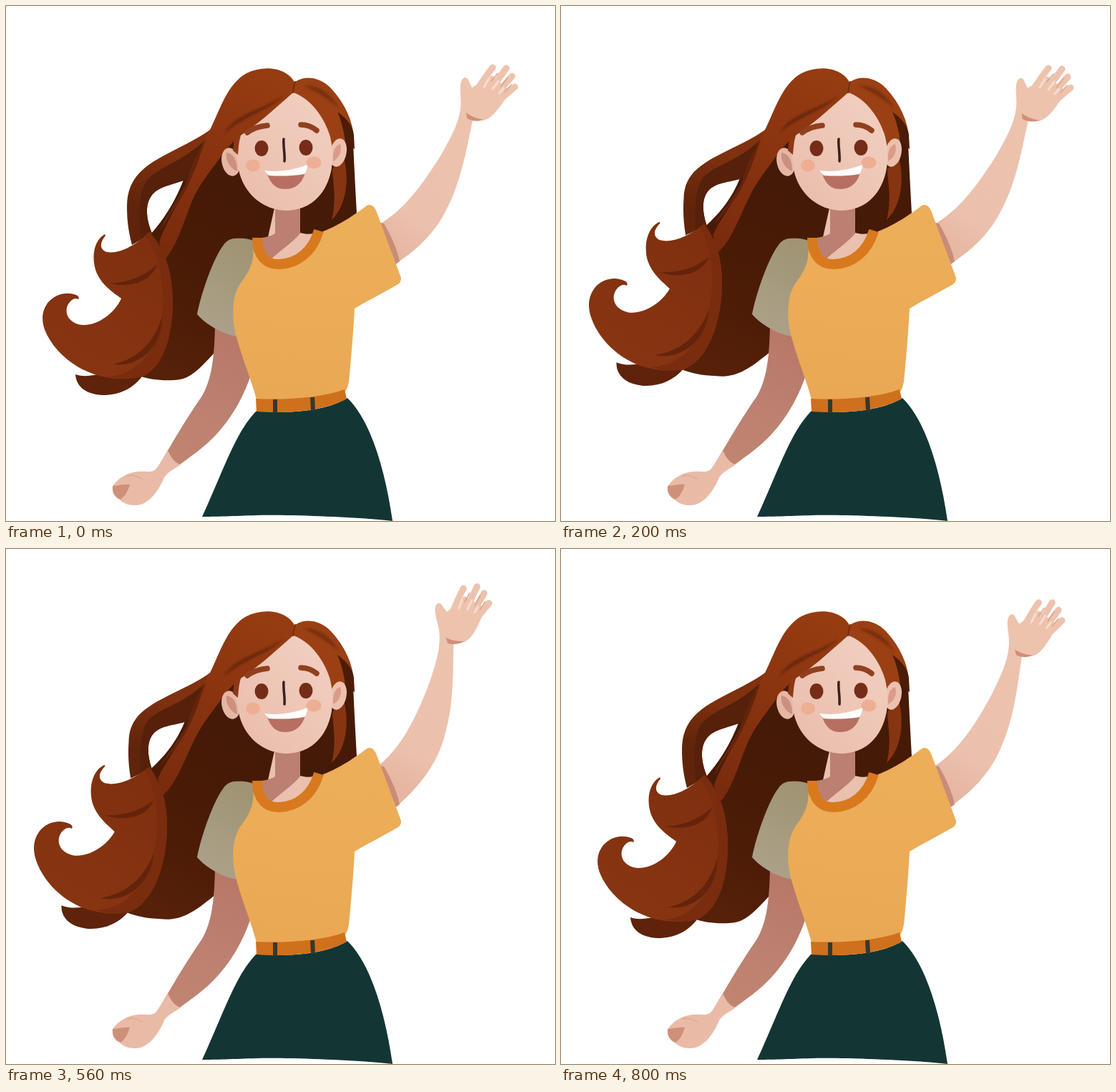
Animation, 767 px wide and 720 px high, one loop 0.92 s. Source, as an HTML page:

```html
<!DOCTYPE html>
<html lang="en">
<head>
<meta charset="utf-8">
<title>Waving woman</title>
<style>
  html, body { margin: 0; width: 100%; height: 100%; overflow: hidden; background: #fff; }
  svg { display: block; width: 100%; height: 100%; }
  .line { fill: none; stroke-linecap: round; }
</style>
</head>
<body>
<svg viewBox="0 0 767 720">
  <defs>
    <linearGradient id="skin" gradientUnits="userSpaceOnUse" x1="325" y1="270" x2="440" y2="160">
      <stop offset="0" stop-color="#eabdac"/><stop offset="1" stop-color="#f1cdbe"/>
    </linearGradient>
    <linearGradient id="armShade" gradientUnits="userSpaceOnUse" x1="530" y1="335" x2="665" y2="140">
      <stop offset="0" stop-color="#e6b6a2"/><stop offset=".25" stop-color="#ebc1ae"/><stop offset="1" stop-color="#edc3ad"/>
    </linearGradient>
    <linearGradient id="lowArm" gradientUnits="userSpaceOnUse" x1="310" y1="460" x2="235" y2="630">
      <stop offset="0" stop-color="#b87868"/><stop offset=".5" stop-color="#bb8070"/><stop offset="1" stop-color="#c08570"/>
    </linearGradient>
    <linearGradient id="shirt" gradientUnits="userSpaceOnUse" x1="420" y1="300" x2="400" y2="550">
      <stop offset="0" stop-color="#edae5a"/><stop offset="1" stop-color="#eaa854"/>
    </linearGradient>
    <linearGradient id="sleeve" gradientUnits="userSpaceOnUse" x1="340" y1="340" x2="285" y2="450">
      <stop offset="0" stop-color="#a09474"/><stop offset="1" stop-color="#aca089"/>
    </linearGradient>
    <linearGradient id="backHair" gradientUnits="userSpaceOnUse" x1="320" y1="290" x2="215" y2="500">
      <stop offset="0" stop-color="#451a06"/><stop offset=".6" stop-color="#4c1c06"/><stop offset="1" stop-color="#562009"/>
    </linearGradient>
    <linearGradient id="strand" gradientUnits="userSpaceOnUse" x1="220" y1="205" x2="185" y2="285">
      <stop offset="0" stop-color="#80310f"/><stop offset="1" stop-color="#5f240a"/>
    </linearGradient>
    <linearGradient id="lock" gradientUnits="userSpaceOnUse" x1="350" y1="90" x2="225" y2="350">
      <stop offset="0" stop-color="#963c11"/><stop offset=".4" stop-color="#8b3410"/><stop offset="1" stop-color="#782b0d"/>
    </linearGradient>
    <linearGradient id="tail" gradientUnits="userSpaceOnUse" x1="200" y1="330" x2="90" y2="490">
      <stop offset="0" stop-color="#80300f"/><stop offset="1" stop-color="#873411"/>
    </linearGradient>
    <filter id="soft" x="-20%" y="-20%" width="140%" height="140%"><feGaussianBlur stdDeviation="1.5"/></filter>
  </defs>

  <!-- loose hair -->
  <g class="hair">
    <path fill="url(#backHair)" d="M300 170 L484 170 C486 215 488 255 490 290 L442 322 L412 326 L380 330 L330 345 L322 470 L291 485 C270 508 256 523 235 523 C215 524 200 522 186 517 L200 420 L203 318 C222 296 236 274 248 243 Z"/>
    <path fill="#5e230a" d="M190 518 C178 534 160 544 135 544 C113 543 98 533 97 515 C108 519 122 517 136 513 Z"/>
    <path fill="url(#strand)" d="M288 171 C262 191 222 205 198 223 C178 238 169 256 169 280 C169 300 171 315 176 334 L204 318 C194 294 194 272 208 260 C219 251 236 249 249 243 L277 200 Z"/>
    <path fill="#56200a" d="M281 184 C249 218 212 224 195 246 C184 266 185 300 190 328 L204 318 C194 294 194 272 208 260 C219 251 236 249 251 243 Z"/>
    <path fill="url(#tail)" d="M138 319 C121 329 119 355 127 374 C135 391 149 400 161 409 C151 431 127 447 107 446 C86 444 79 426 89 414 C93 409 98 408 101 410 C103 408 101 405 98 404 C85 399 70 402 59 414 C49 427 49 442 56 457 C72 491 108 514 140 519 C163 523 180 520 190 518 C221 505 232 460 233 420 C234 372 222 340 200 316 C181 335 158 347 141 344 C130 340 131 331 139 321 Z"/>
    <path fill="#792c0e" d="M201 316 C222 340 234 372 233 420 C232 460 221 505 190 518 C176 521 158 521 144 518 C181 515 207 488 217 440 C224 400 216 350 195 322 Z"/>
    <path fill="#64240b" d="M145 388 C174 386 194 377 211 361 C205 382 180 395 145 388 Z"/>
    <path fill="#64240b" d="M150 501 C184 493 208 470 218 433 C220 471 190 506 150 501 Z"/>
    <path fill="url(#lock)" d="M404 108 C394 87 362 81 336 94 C309 109 299 145 286 171 C270 198 262 222 250 252 C240 280 222 305 214 330 L220 356 C239 338 248 300 262 268 C274 243 290 226 306 202 L324 183 C350 164 384 150 404 122 Z"/>
    <path fill="#64240b" d="M279 186 C268 218 256 256 232 288 L215 315 C218 303 234 280 250 250 C258 224 268 202 279 186 Z"/>
  </g>

  <!-- raised arm -->
  <g id="arm">
    <path fill="url(#armShade)" d="M490 320 L525 303 C561 281 588 240 608 208 C620 186 632 166 635 143 C637 130 632 112 637 103 C640 98 645 99 647 106 L651 114 L679 97 L705 119 C692 138 681 157 667 160 L652 160 C645 190 638 240 617 281 C599 321 566 348 532 368 L515 350 Z"/>
    <g class="line" stroke="#edc3ad" stroke-width="9">
      <path d="M655 120 C664 110 671 96 680 86"/>
      <path d="M668 125 C681 114 690 99 699 87"/>
      <path d="M676 130 C689 119 699 108 707 98"/>
      <path d="M675 140 C690 133 700 122 711 113"/>
    </g>
    <g class="line" stroke="#f6dccf" stroke-width="3">
      <path d="M668 113 L675 101"/><path d="M680 116 L688 105"/><path d="M689 122 L695 115"/>
    </g>
    <g class="line" stroke="#dca48d" stroke-width="1.5">
      <path d="M678 105 L687 94"/><path d="M691 113 L701 100"/><path d="M697 120 L706 110"/>
    </g>
    <path fill="#d38e75" d="M643 149 C650 155 658 157 667 159 C659 162 650 161 644 157 Z"/>
  </g>
  <path fill="#c98c78" d="M522 303 L528 304 C538 321 546 339 550 357 L542 363 Z"/>

  <!-- lowered arm -->
  <path fill="url(#lowArm)" d="M292 448 L335 458 L341 519 C326 562 300 600 262 627 L236 646 L215 640 C230 615 251 578 274 545 C288 520 291 490 292 448 Z"/>
  <path fill="#e9bba7" d="M226 621 C230 631 236 639 244 641 C236 647 226 651 221 659 C214 676 203 692 188 697 C176 700 164 696 159 690 C150 687 147 676 150 670 C157 660 170 652 184 651 C194 650 203 653 209 648 C216 639 221 630 226 621 Z"/>
  <path fill="#cf9078" d="M149 671 C157 671 164 668 173 669 C170 679 166 686 160 690 C151 686 148 678 149 671 Z"/>
  <path class="line" stroke="#dfa994" stroke-width="1.5" d="M170 657 C178 655 184 658 190 661"/>

  <!-- neck -->
  <path fill="#eac0ae" d="M376 278 L411 278 L411 317 C421 320 430 319 438 315 C432 345 405 362 380 360 L360 350 Z"/>
  <path fill="#bb8071" d="M376 278 L411 278 L411 318 C397 334 382 342 366 358 C354 348 349 336 349 325 C360 324 370 322 376 318 Z"/>

  <!-- clothes -->
  <path fill="url(#sleeve)" d="M320 325 C332 324 340 326 346 328 L350 360 L330 420 L323 462 C303 459 280 446 267 431 C273 400 290 352 304 334 C309 327 315 325 320 325 Z"/>
  <path fill="url(#shirt)" d="M345 340 C356 372 420 368 443 315 C465 307 490 290 504 279 C510 276 514 280 517 286 L552 380 C552 385 550 388 546 390 C525 402 505 412 487 423 C485 460 482 495 479 525 C477 535 475 539 471 541 C440 552 390 551 350 550 C342 520 325 480 319 450 C314 416 320 397 331 383 C340 370 347 357 345 340 Z"/>
  <path class="line" stroke="#d8791e" stroke-width="14" style="stroke-linecap:butt" d="M351 324 C351 350 364 362 382 361 C406 360 428 345 437 314"/>
  <path fill="#133634" d="M350 566 C400 571 450 565 477 548 C510 580 530 650 540 720 C500 715 400 711 350 712 C320 713 290 714 274 714 C290 680 308 632 325 601 C335 583 343 573 350 566 Z"/>
  <path fill="#cf701d" d="M349 549 C392 551 440 548 473 536 L476 549 C450 564 400 571 350 567 Z"/>
  <path class="line" stroke="#34392b" stroke-width="6" style="stroke-linecap:butt" d="M376 550 L376 569 M428 547 L429 566"/>

  <!-- head -->
  <path fill="#9a4014" d="M400 121 L404 106 C416 97 438 98 454 115 C474 137 485 161 486 186 L470 192 L450 200 Z"/>
  <path fill="#4b1c07" d="M463 148 C477 158 485 168 486 181 L487 200 L474 190 C472 175 469 162 463 148 Z"/>
  <path fill="#863511" d="M471 208 C481 242 475 280 455 299 C462 270 457 252 456 228 Z"/>
  <ellipse cx="464" cy="205" rx="11.5" ry="20" transform="rotate(12 464 205)" fill="#ecc1af"/>
  <path fill="#d99c88" d="M467 193 C459 195 456 205 457 217 C465 213 470 203 467 193 Z"/>
  <ellipse cx="314" cy="218" rx="12.5" ry="20" transform="rotate(-12 314 218)" fill="#e6b6a4"/>
  <path fill="#cb907e" d="M308 205 C318 206 323 216 323 231 C313 227 306 215 308 205 Z"/>
  <path fill="url(#skin)" d="M401 121 C421 127 444 151 453 183 C459 210 457 238 442 260 C428 280 408 286 390 286 C353 284 328 256 324 222 C321 203 321 190 326 182 C351 166 373 146 401 121 Z"/>
  <path fill="#8c3813" d="M319 184 L329 178 C325 189 325 198 324 208 L317 202 Z"/>
  <g filter="url(#soft)">
    <path fill="#6b260b" d="M305 178 C319 150 358 146 388 125 C370 145 336 152 305 178 Z"/>
    <path fill="#7c2e0e" d="M416 111 C434 110 454 121 465 143 C451 130 435 121 416 111 Z"/>
  </g>
  <path class="line" stroke="#7a2c0d" stroke-width="2" d="M404 106 C402 112 402 116 401 121"/>

  <!-- face -->
  <g class="line" stroke="#91401f" stroke-width="7.5">
    <path d="M337 177 C345 171 355 168 365 167"/>
    <path d="M412 166 C421 166 428 169 434 174"/>
  </g>
  <ellipse cx="357" cy="199" rx="9.5" ry="11" fill="#752d17"/>
  <ellipse cx="419" cy="198" rx="9.5" ry="11" fill="#752d17"/>
  <path class="line" stroke="#392020" stroke-width="3.5" d="M388 186 C387 196 390 207 389 217"/>
  <ellipse cx="345" cy="223" rx="10" ry="8.5" fill="#eeae94"/>
  <ellipse cx="430" cy="219" rx="10.5" ry="8.5" fill="#eeae94"/>
  <path fill="#b76f61" d="M365 235 C370 249 377 256 390 256 C405 256 414 247 418 233 Z"/>
  <path fill="#fff" d="M361 230 C382 233 402 229 421 222 C421 228 419 232 417 235 C399 238 381 238 367 237 Z"/>
</svg>
<script>
  const LOOP = 920;
  // start time in ms, hair lift in degrees, arm turn in degrees
  const poses = [
    [0, 0, 0], [80, 3, 2.4], [200, 5.6, 0.3], [320, 7.4, -3.2],
    [440, 7.4, -6.5], [560, 5.6, -10.7], [680, 3, -6.2], [800, 0, -3.5]
  ];
  const arm = document.getElementById('arm');
  const strands = [...document.querySelectorAll('.hair path')]
    .map(node => ({ node, shape: node.getAttribute('d') }));

  const smooth = (from, to, v) => {
    const k = Math.min(1, Math.max(0, (v - from) / (to - from)));
    return k * k * (3 - 2 * k);
  };

  // Loose ends swing fully, hair near the head stays put; low ends rise less.
  function lift(x, y, degrees) {
    const a = degrees * Math.PI / 180 * smooth(180, 330, y) * smooth(300, 220, x);
    const dx = x - 318, dy = y - 315;
    return [x - a * dy, y + a * dx * (1 - dy / 900)];
  }

  function show([, hairLift, armTurn]) {
    arm.setAttribute('transform', `rotate(${armTurn} 494 288)`);
    for (const { node, shape } of strands) {
      node.setAttribute('d', shape.replace(/([\d.]+) ([\d.]+)/g, (_, x, y) =>
        lift(+x, +y, hairLift).map(v => v.toFixed(1)).join(' ')));
    }
  }

  const start = performance.now();
  let current;
  function tick() {
    const time = (performance.now() - start) % LOOP;
    const pose = poses.findLast(p => p[0] <= time);
    if (pose !== current) show(current = pose);
    requestAnimationFrame(tick);
  }
  tick();
</script>
</body>
</html>
```
